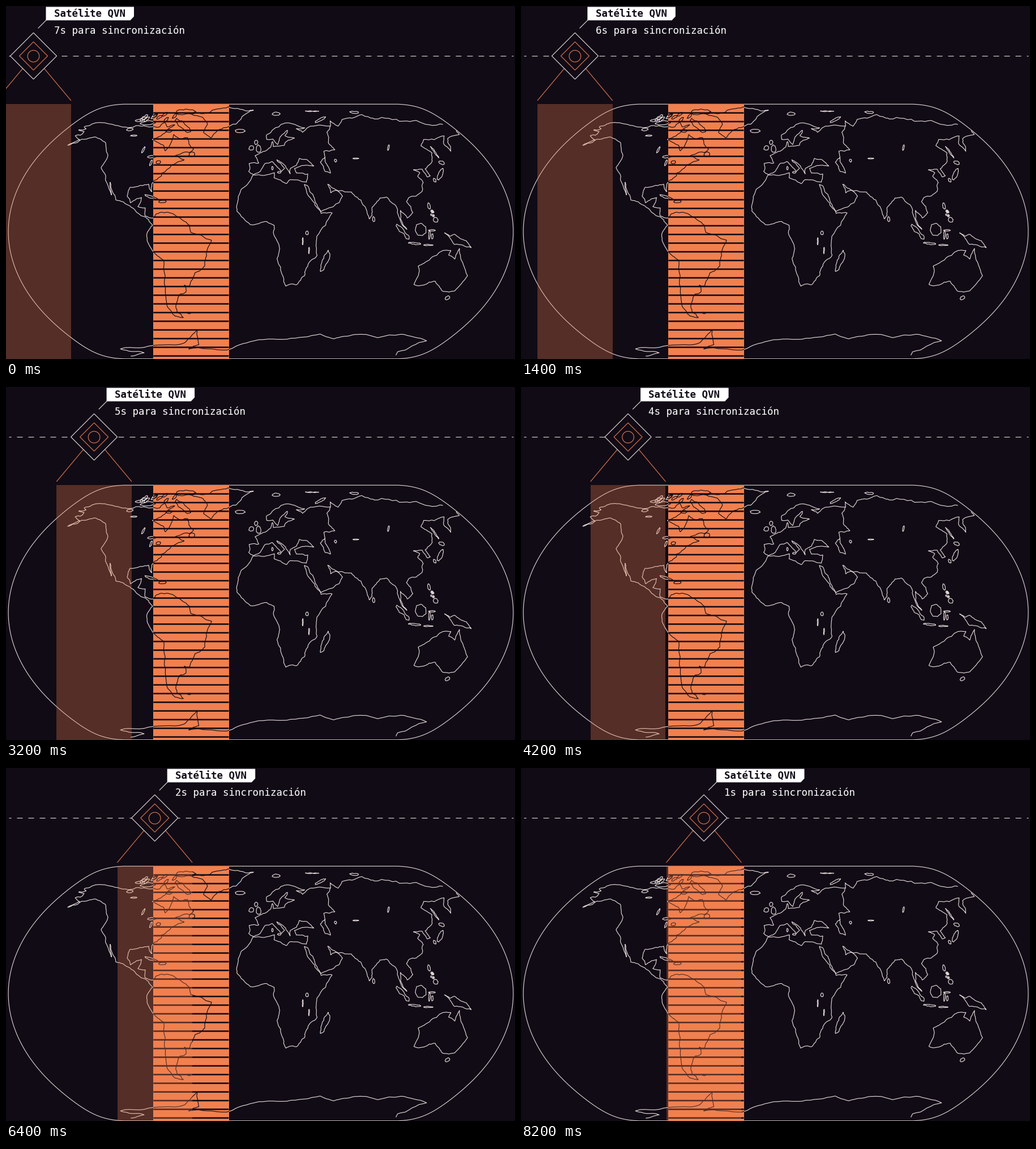
These frames come from a looping animation (899 by 623 pixels, 8.4 s). A matplotlib script:

```python
import numpy as np
import matplotlib.pyplot as plt
from matplotlib.animation import FuncAnimation
from matplotlib.collections import LineCollection
from matplotlib.patches import Circle, Polygon, Rectangle
from matplotlib.transforms import Affine2D

W, H, DPI = 899, 623, 64
PX = 72 / DPI
FRAMES, INTERVAL = 42, 200
START_X, STEP_X = 48.5, 6.695
BG, ORANGE, PALE, WHITE = "#110b16", "#f0804f", "#e4dad8", "#ffffff"
BEAM = "#de774b"
BAND_X, BAND_W, TOP = 260.3, 133.2, 172.8

rng = np.random.default_rng(4)
coasts = []


def project(lon, lat):
    """Natural Earth projection in stage pixels, slightly narrowed to the poles."""
    f = np.radians(lat)
    k = .8707 - .131979*f**2 - .013791*f**4 + .003971*f**10 - .001529*f**12
    k *= 1 - .012 * np.sin(f)**2
    y = f * (1.007226 + .015085*f**2 - .044475*f**6 + .028874*f**8 - .005916*f**10)
    return np.column_stack([450 + 163 * np.radians(lon) * k, 398 - 158 * y])


def roughen(p, amount):
    """Insert a randomly displaced midpoint into every segment."""
    d = np.diff(p, axis=0)
    normal = np.column_stack([-d[:, 1], d[:, 0]])
    mid = p[:-1] + d / 2 + normal * rng.normal(0, amount, (len(d), 1))
    out = np.empty((len(p) + len(mid), 2))
    out[::2], out[1::2] = p, mid
    return out


def coast(*v, amount=.06):
    p = project(np.array(v[::2], float), np.array(v[1::2], float))
    for _ in range(3):
        p = roughen(p, amount)
    coasts.append(p)


def isle(lon, lat, w, h, tilt=0, n=7):
    """Ragged ellipse, sizes in degrees."""
    a = np.linspace(0, 2 * np.pi, n, endpoint=False)
    r = rng.uniform(.85, 1.1, n)
    t = np.radians(tilt)
    u, v = w / 2 * r * np.cos(a), h / 2 * r * np.sin(a)
    x, y = lon + u * np.cos(t) - v * np.sin(t), lat + u * np.sin(t) + v * np.cos(t)
    coast(*np.column_stack([np.r_[x, x[0]], np.r_[y, y[0]]]).ravel())


def scatter(count, lon, lat, size):
    for _ in range(count):
        isle(rng.uniform(*lon), rng.uniform(*lat), *rng.uniform(.5, 1, 2) * size, n=6)


# North America: Arctic and Atlantic, then Pacific
coast(-166,68, -156,71.3, -136,69, -116,69, -95,68, -93,71.5, -88,68, -82,69.5, -86,66,
      -94.5,59, -82.3,55, -79,51.3, -77,56.5, -78,62.4, -69.5,59, -64.5,60.3, -56,52.5,
      -59,50.2, -69.5,48, -61.2,45.5, -66,44, -70,42, -76,37, -75.6,35.3, -81.4,30.4,
      -80.3,25.2, -83.8,30, -90,29.1, -97,28, -97.8,22.5, -94.5,18.2, -90.4,20.8,
      -87,21.5, -88.8,15.9, -83.3,15, -83,10, -77.3,8.5)
coast(-80,7.4, -85.7,10, -94.5,16.2, -105.5,20, -113,31.2, -109.5,23.2, -117,32.5,
      -124.3,40.4, -124,48.3, -133.5,57, -146,60.7, -152,59.3, -163.5,55, -157.5,58.7,
      -165,61.5, -161,64.5, -167.5,65.6, -162,66.5, -166,68)
# South America
coast(-77.3,8.5, -71.8,12.2, -62,10.7, -51,4, -50,-.5, -35.2,-5.5, -39,-13, -41,-22,
      -48.5,-26, -54,-34.5, -58,-34, -57.5,-38, -62.3,-39.5, -65,-42, -67.5,-46, -69,-51,
      -65.5,-54.9, -72,-54, -75.5,-48, -73.5,-38, -70.3,-18.3, -76.2,-14, -81.2,-5.5,
      -77.2,4, -80,7.4)
# Greenland
coast(-73,78.2, -50,82.3, -32,83.5, -8,81.5, -19,76, -24,70, -40,65, -44,60, -52,64,
      -51,70, -58,75, -73,78.2)
# Europe and the Russian Arctic
coast(-5.6,36, -9.3,38, -9.2,43.1, -1.6,43.4, -4.6,48.2, 1.6,50.8, 8.5,54, 10,57.5,
      10.5,54.2, 20,55, 22,57.5, 29.5,59.9, 21.5,61.5, 24.5,65.5, 17.3,61, 14.3,55.5,
      10.5,59.3, 5.2,59, 5,62, 14,67.5, 26,71, 41,67.3, 33,66.7, 38,64, 44,67.5, 66,68.7,
      68,72.5, 73,68.5, 80.5,73.6, 104.5,77.6, 113,74, 139.5,72.3, 160,69.6, 174,69.8)
# Pacific Asia
coast(179,65.2, 178,62.5, 163.5,59.5, 156.7,51, 156,56, 163,61.5, 142,59, 135.3,54.7,
      140.3,50, 135.5,44, 127.5,39.7, 129,35.2, 126.5,34.5, 125,39.5, 118,39, 122,37.2,
      119.3,35, 121.8,31, 119,25.5, 108.3,21.6, 105.8,19, 109.2,12, 104.8,8.6, 100.5,13.4,
      100,8, 104.2,1.4, 100.3,5.5, 97.6,16.3, 92,21.8, 87,21.3, 80.2,15.2, 79.8,10.3,
      77.6,8, 72.8,20, 69,22.3, 66.8,25, 57,25.7, 50,30, 51.4,24.5, 56.3,26.2, 59.8,22.5,
      52.2,15.7, 43.4,12.7, 39,21.5, 34.9,29, 32.5,29.9)
# Africa
coast(32.5,29.9, 37.2,20, 43.3,11.5, 51.2,11.8, 40,-3, 40.6,-15, 34.9,-20, 32.5,-28,
      27,-33.7, 19,-34.6, 14.5,-22.5, 11.8,-17.5, 13.6,-11, 9,-1, 9.5,4, 4.4,6.3,
      -7.5,4.4, -17.2,13, -16.5,22, -9.8,30, -5.9,35.8, 10.5,37.2, 10.1,34, 19,30.3,
      22,32.8, 34.3,31.3, 36,36.5)
# Northern Mediterranean, Black Sea
coast(36,36.5, 27.3,37, 26.2,40, 35,42, 41.5,41.5, 37,45.5, 31,46.4, 28,42, 23,40,
      22.5,36.5, 19.4,41.5, 12.8,45.5, 18.4,40, 15.8,38, 9,44.4, 3.2,43, -.5,38, -5.6,36)
# Urals and Caspian Sea
coast(66,68.7, 60,64, 58,57, 61.5,52, 52,51, 51.8,47)
coast(51.8,47, 51,44.5, 53.5,37, 49.5,38, 47.2,44, 51.8,47)
# New Guinea, Australia
coast(131,-.8, 135,-3, 138,-1.7, 147,-6, 150.8,-10.3, 143.5,-8.5, 138.5,-8.2, 131,-.8)
coast(115,-22, 115.8,-33.5, 123.5,-33.9, 131,-31.5, 140,-37.8, 149,-37.6, 153.5,-28,
      146.2,-19, 142.5,-10.8, 140.5,-17.5, 135.5,-15, 136.5,-12, 131,-12, 122.3,-18, 115,-22)
# Antarctica
coast(-150,-85, -127,-81.5, -146,-78, -103,-74.8, -75,-73, -57.5,-63.4, -62,-74.5,
      -75,-78, -36,-79, -11,-72.3, 25,-70.3, 55,-66.4, 70,-70, 87,-66.8, 130,-66.6,
      161,-71.5, 147,-80.5, 153,-84, amount=.04)

# Islands and lakes: centre, size, tilt
for spot in [(-109,71, 14,3.5), (-120,73, 8,2), (-74,69, 26,4,-24), (-80,80, 22,5),
             (-84,65, 6,2), (-56,49, 5,3), (-80,21.8, 11,1.4,-14), (-71.3,19, 6,1.6),
             (-59.5,-51.8, 3,1), (-121,66, 6,2), (-113,61.7, 6,1), (-97.5,52, 1.5,4),
             (-88,47.5, 7,1.6), (-86.8,43.7, 1.5,4), (-81,43.8, 4,2), (33,-1, 2.2,2.6),
             (30,-6, .7,5), (34.6,-12, .7,4.5), (59.5,45, 2,2), (76,46.3, 5,.6),
             (107,53.5, 5.5,1,45), (-18.8,64.9, 9.5,2.6), (16,78.3, 9,2.6),
             (55,80.6, 14,.8), (59,73.5, 14,1.8,18), (99,79.6, 9,2), (-1.8,52.7, 4.5,5),
             (-4,57, 3.5,3), (-8,53.3, 4.2,3.2), (14.2,37.5, 3,1.2), (9,40.1, 1.2,2.2)]:
    isle(*spot)
for spot in [(46.7,-18.7, 4.5,14,-18), (137.5,36.3, 12,2.4,42), (131,32.5, 2,2.8),
             (143,43.5, 4.5,2.6), (143,50, 1.2,8), (80.8,7.7, 1.8,3.4),
             (101,0, 15,3,-45), (110,-7.5, 10,1.2,-5), (114,1, 8,8.5,30),
             (119.5,-8.6, 7,.7), (121.5,16.2, 2,4.5), (125,7.5, 3.5,3.4),
             (120.3,-2, 1.2,6), (122,.7, 5.5,.8), (122.3,-3, 1.3,3.5),
             (146.4,-42, 3.6,2.6)]:
    isle(*spot)
scatter(9, (-118, -88), (73.5, 78), 5)
scatter(7, (122, 125), (9.5, 13), 1.8)

fig = plt.figure(figsize=(W / DPI, H / DPI), dpi=DPI, facecolor=BG)
ax = fig.add_axes([0, 0, 1, 1])
ax.set_xlim(0, W)
ax.set_ylim(H, 0)
ax.axis("off")

# Map and its frame
side = project(np.full(181, 180.), np.linspace(-90, 90, 181))
oval = np.vstack([side, (side * [-1, 1] + [900, 0])[::-1]])
ax.add_patch(Polygon(oval, fill=False, ec=PALE, lw=1.1 * PX, zorder=1))
ax.add_collection(LineCollection(coasts, colors=PALE, lw=1.15 * PX, zorder=1))

# Target band: the coast turns dark inside it
band = ax.add_patch(Rectangle((BAND_X, TOP), BAND_W, H - TOP, fc=ORANGE, lw=0, zorder=2))
bars = np.arange(188.7, H, 15.32)
ax.add_collection(LineCollection([[(BAND_X, y), (BAND_X + BAND_W, y)] for y in bars],
                                 colors=BG, lw=2.6 * PX, zorder=3, snap=False))
dark = LineCollection(coasts, colors=BG, lw=1.15 * PX, zorder=3)
ax.add_collection(dark)
dark.set_clip_path(band)

# Orbit
dashes = [[(max(x, 4.5), 88.3), (min(x + 10, 896), 88.3)]
          for x in np.arange(-1, 896, 19.87)]
ax.add_collection(LineCollection(dashes, colors=PALE, lw=1.1 * PX, zorder=3))

# Satellite group, drawn around x = 0
slide = Affine2D()
moving = slide + ax.transData


def shape(patch, z=5):
    patch.set_transform(moving)
    patch.set_zorder(z)
    ax.add_artist(patch)


def line(x, y, color):
    ax.plot(x, y, color=color, lw=1.15 * PX, transform=moving, zorder=5)


def diamond(r, color):
    pts = [(0, 88.2 - r), (r, 88.2), (0, 88.2 + r), (-r, 88.2)]
    shape(Polygon(pts, fc=BG, ec=color, lw=1.15 * PX, joinstyle="miter"))


def label(y, s, color, weight="normal"):
    return ax.text(36.3, y, s, color=color, weight=weight, family="DejaVu Sans Mono",
                   size=17.45 * PX, va="baseline", transform=moving, zorder=6)


shape(Rectangle((-66.2, TOP), 132.4, H - TOP, fc=ORANGE, alpha=.3, lw=0), 4)
for s in (-1, 1):
    line([s * 18.7, s * 66], [110, 166.5], BEAM)
diamond(41, PALE)
diamond(25, BEAM)
shape(Circle((0, 88.5), 10.3, fill=False, ec=BEAM, lw=1.15 * PX))
line([8.5, 23], [39, 24.5], PALE)
shape(Polygon([(22, 1.5), (177.5, 1.5), (177.5, 18.5), (171, 25.3), (22, 25.3)], fc=WHITE, lw=0))
label(19.8, "Satélite QVN", BG, "bold")
count = label(49, "", WHITE)


def update(i):
    slide.clear().translate(START_X + STEP_X * i, 0)
    count.set_text(f"{7 - i // 6}s para sincronización")
    return [count]


anim = FuncAnimation(fig, update, frames=FRAMES, interval=INTERVAL,
                     repeat=True, repeat_delay=0, blit=False)
plt.show()
```
